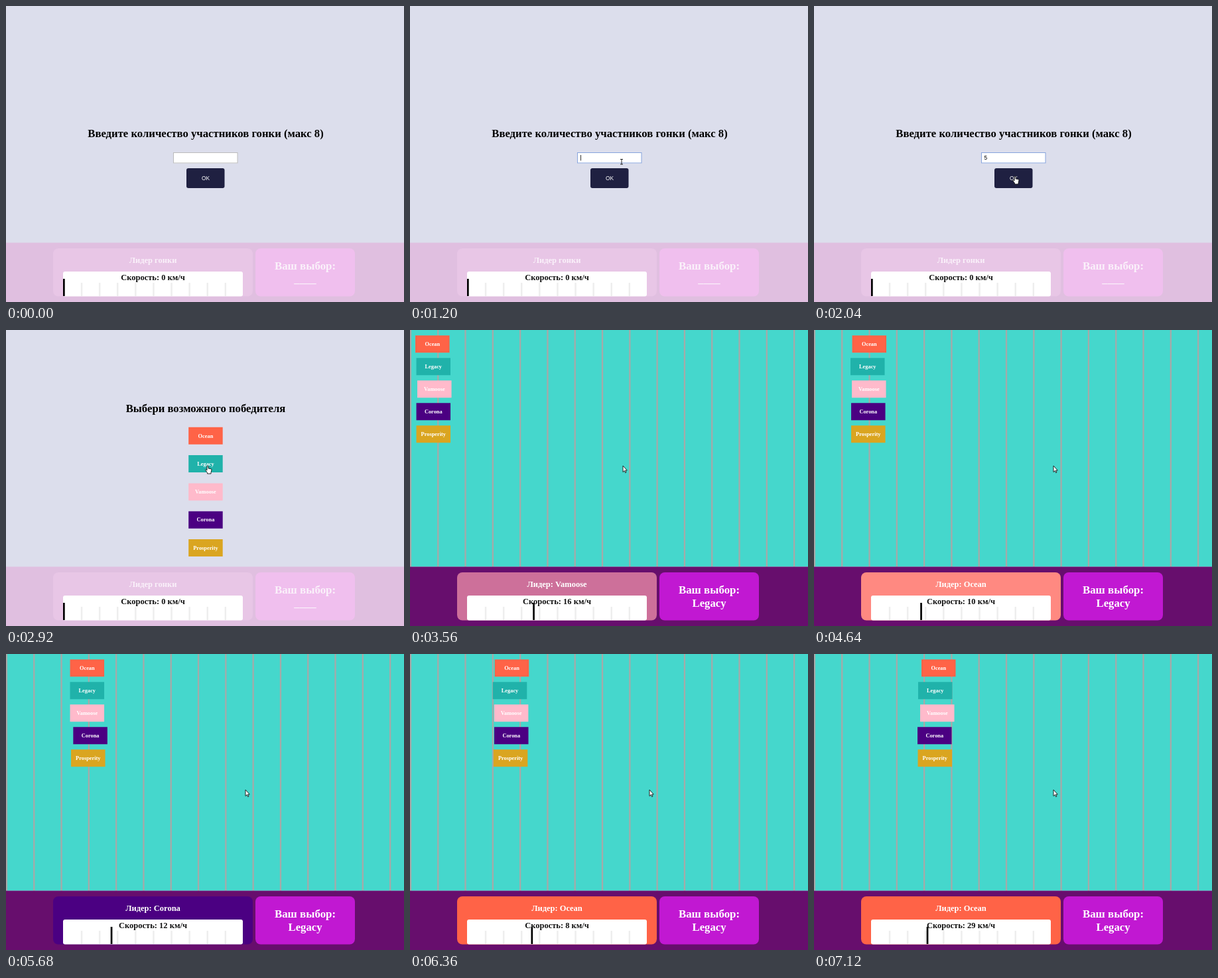
An HTML page with a canvas for the animation above (7160 ms loop, 600 by 447 pixels).

```html
<!DOCTYPE html>
<html lang="ru">
<head>
<meta charset="utf-8">
<style>
html, body { margin: 0; width: 100%; height: 100%; overflow: hidden; }
canvas { display: block; }
</style>
</head>
<body>
<canvas id="stage" width="600" height="447"></canvas>
<script>
const ctx = document.getElementById('stage').getContext('2d');
const LOOP = 7160, PICK = 2050, RACE = 3400;
const SERIF = '"Liberation Serif", "Times New Roman", serif';
const SANS = '"Liberation Sans", Arial, sans-serif';
const START_RGB = [140, 16, 92];
const RACE_TIMES = [RACE, 3560, 4640, 5680, 7120, LOOP];
const racers = [
  { name: 'Ocean', rgb: [255, 99, 71], xs: [8, 8, 57.5, 96.5, 162, 163.5], sway: 1.5 },
  { name: 'Legacy', rgb: [32, 178, 170], xs: [8, 9.5, 55, 96.5, 157, 158.5], sway: -2 },
  { name: 'Vamoose', rgb: [255, 186, 203], xs: [8, 11, 57, 96.5, 160, 161.5], sway: 2 },
  { name: 'Corona', rgb: [75, 0, 130], xs: [8, 9.5, 56, 101.3, 156, 157.5], sway: -1 },
  { name: 'Prosperity', rgb: [218, 165, 32], xs: [8, 9.5, 56, 98, 156.5, 158], sway: 1 }
];
const speeds = [22, 16, 41, 27, 10, 38, 12, 33, 8, 44, 29];
const needleTimes = [RACE, 3560, 4000, 4640, 5160, 5680, 6400, 7120];
const needleXs = [87, 186.5, 152, 161.5, 141, 159, 184, 171];

const pointerTimes = [0, 280, 800, 1480, 1750, 2150, 2600, 3400, 3560, 3850, 4250];
const pointerXs = [430, 430, 319, 319, 304, 304, 305, 305, 321, 321, 361];
const pointerYs = [452, 452, 235, 235, 262, 262, 210, 210, 210, 210, 210];

const css = rgb => `rgb(${rgb.map(Math.round).join()})`;
const smooth = u => u * u * (3 - 2 * u);

function along(times, values, t, ease = u => u) {
  let i = 0;
  while (i < times.length - 2 && t >= times[i + 1]) i++;
  const u = Math.min(1, Math.max(0, (t - times[i]) / (times[i + 1] - times[i])));
  return values[i] + (values[i + 1] - values[i]) * ease(u);
}

function rect(x, y, w, h, color, radius = 0) {
  ctx.fillStyle = color;
  ctx.beginPath();
  ctx.roundRect(x, y, w, h, radius);
  ctx.fill();
}

function text(str, x, y, size, color, font = SERIF, weight = 'bold', align = 'center') {
  ctx.font = `${weight} ${size}px ${font}`;
  ctx.textAlign = align;
  ctx.fillStyle = color;
  ctx.fillText(str, x, y);
}

function tag(racer, x, y) {
  rect(x, y, 51.5, 26, css(racer.rgb));
  text(racer.name, x + 25.75, y + 15.7, 8.35, '#fff');
}

function racerX(racer, t) {
  const i = RACE_TIMES.findLastIndex(start => t >= start);
  const u = i < 2 || i > 3 ? 0 : (t - RACE_TIMES[i]) / (RACE_TIMES[i + 1] - RACE_TIMES[i]);
  return along(RACE_TIMES, racer.xs, t) + racer.sway * Math.sin(2 * Math.PI * u);
}

const leaderAt = t => racers.reduce((a, b) => racerX(b, t) > racerX(a, t) ? b : a);

// The panel fades between leaders: average the colours of the last 300 ms.
function panelColor(t) {
  const sum = [0, 0, 0], n = 16;
  for (let k = 0; k < n; k++) {
    const past = t - k * 300 / n;
    const rgb = past < RACE ? START_RGB : leaderAt(past).rgb;
    rgb.forEach((c, j) => sum[j] += c / n);
  }
  return css(sum);
}

function dashboard(t) {
  const racing = t >= RACE;
  const ink = racing ? '#fff' : '#faf1fa';
  rect(0, 357.5, 600, 90, racing ? '#670e6d' : '#e0bfe0');
  rect(71, 366, 301, 72.5, racing ? panelColor(t) : '#e8c6e6', 8);
  rect(376, 366, 150, 72.5, racing ? '#c118d2' : '#f0bfee', 8);
  text(racing ? 'Лидер: ' + leaderAt(t).name : 'Лидер гонки', 221.5, 388, 12.5, ink);
  text('Ваш выбор:', 451, 398, 16.9, ink);
  text(racing ? 'Legacy' : '____', 451, 417.5, 16.7, ink);

  rect(86, 401, 271, 37.5, '#fff', 3);
  for (let i = 1; i < 10; i++) rect(85.7 + i * 27.1, 418, 2.5, 20, '#eeeeee');
  const speed = racing ? speeds[Math.floor((t - 3200) / 360)] : 0;
  rect((racing ? along(needleTimes, needleXs, t, smooth) : 87.3) - 1.3, 412, 2.7, 26, '#000');
  text(`Скорость: ${speed} км/ч`, 221.5, 414, 12.5, '#111');
}

function entryForm(t) {
  text('Введите количество участников гонки (макс 8)', 301, 198.3, 16.7, '#000');
  const focused = t >= 900;
  rect(252.5, 221.5, 96.5, 16, '#fff');
  ctx.strokeStyle = focused ? '#86a3dc' : '#bbb';
  ctx.lineWidth = 1;
  ctx.strokeRect(252.5, 221.5, 96.5, 15.5);
  const typed = t >= 1480;
  if (typed) text('5', 256.5, 232.3, 8.35, '#000', SANS, 'normal', 'left');
  if (focused && t < 1700) rect(typed ? 262 : 257, 225, 1, 8.5, '#333');
  rect(272, 245, 57.5, 30, '#1f2041', 3);
  text('OK', 301, 263, 8.35, '#fff', SANS, 'normal');
}

function picker() {
  text('Выбери возможного победителя', 301, 123.7, 16.7, '#000');
  racers.forEach((r, i) => tag(r, 275.2, 146.8 + i * 42.3));
}

function race(t) {
  rect(0, 0, 600, 357.5, '#45d7cc');
  for (let i = 0; i < 15; i++) rect(i * 41.3 - 0.2, 0, 2.3, 357.5, '#a5aaa9');
  racers.forEach((r, i) => tag(r, racerX(r, t), 8.2 + i * 34));
}

const shapes = {
  arrow: new Path2D('M0-5V4.5L2.2 2.5L3.6 5.6L5 5L3.6 2H6.3Z'),
  hand: new Path2D('M-2-4.5Q-1-5.8 0-4.5V-1L4-.3Q5 0 5 1L4 5.5V7H-1.5V5.5L-4.4 1.5Q-4.4.2-3.2.8L-2 1.8Z'),
  beam: new Path2D('M-2-3.5H2M0-3.5V4M-2 4H2')
};

function pointer(t) {
  const x = along(pointerTimes, pointerXs, t, smooth);
  const y = along(pointerTimes, pointerYs, t, smooth);
  const inField = t < PICK && x > 252 && x < 349 && y > 221 && y < 238;
  const onButton = t < PICK ? x > 272 && x < 330 && y > 245 && y < 275
    : t < RACE && x > 275 && x < 327 && y > 189 && y < 215;
  const kind = inField ? 'beam' : onButton ? 'hand' : 'arrow';
  ctx.save();
  ctx.translate(x, y);
  ctx.strokeStyle = '#111';
  ctx.lineWidth = 0.9;
  ctx.fillStyle = '#fff';
  if (kind !== 'beam') ctx.fill(shapes[kind]);
  ctx.stroke(shapes[kind]);
  ctx.restore();
}

function draw(now) {
  const t = now % LOOP;
  rect(0, 0, 600, 447, '#dcdeec');
  if (t < PICK) entryForm(t);
  else if (t < RACE) picker();
  else race(t);
  dashboard(t);
  pointer(t);
  requestAnimationFrame(draw);
}
requestAnimationFrame(draw);
</script>
</body>
</html>
```
